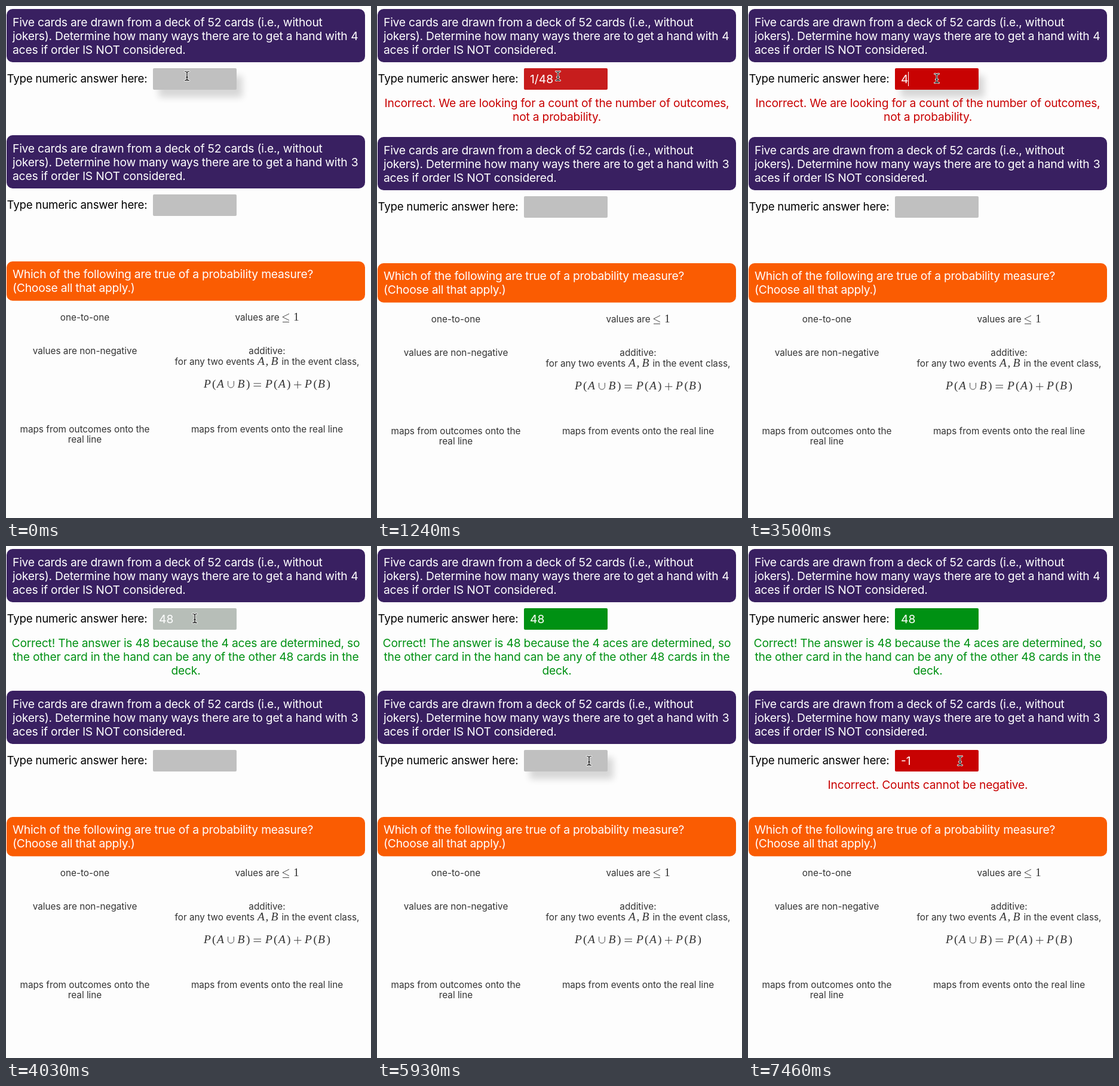
Animation of 611x856 px, one loop 8 s. Source, as an HTML page:

```html
<!DOCTYPE html>
<html lang="en">
<head>
<meta charset="utf-8">
<title>Probability quiz</title>
<style>
  html, body { margin: 0; width: 100%; height: 100%; overflow: hidden; background: #fdfdfd; }
  svg { display: block; }
  text { font-family: Inter, "Open Sans", sans-serif; font-optical-sizing: none; }
  .question, .feedback { font-size: 19.3px; letter-spacing: -.012em; }
  .question { fill: #fff; }
  .feedback, .mid { text-anchor: middle; }
  .label { font-size: 18.7px; letter-spacing: -.012em; fill: #000; }
  .typed { font-size: 19.3px; fill: #fff; }
  .answer { font-size: 15.3px; fill: #333; }
  .math { font-family: "Liberation Serif", serif; font-size: 19.5px; fill: #333; }
  .italic { font-style: italic; }
  .sign { fill: none; stroke: #333; stroke-width: .9; }
  .wrong { fill: #c80202; }
  .right { fill: #009113; }
  .shadow { fill: #000; opacity: .15; filter: blur(6px); }
  .caret { fill: #fff; }
</style>
</head>
<body>
<svg width="611" height="856" viewBox="0 0 611 856">
  <defs>
    <g id="card">
      <rect x="1" width="600" height="89" rx="10" fill="#392061"/>
      <text class="question" x="11" y="29">Five cards are drawn from a deck of 52 cards (i.e., without</text>
      <text class="question" x="11" y="52">jokers). Determine how many ways there are to get a hand with </text>
      <text class="label" x="1.5" y="123">Type numeric answer here:</text>
    </g>
    <path id="beam" fill="none" stroke-linecap="round"
      d="M-3.5-7.5Q-.5-7.5 0-6Q.5-7.5 3.5-7.5M0-6V6M-3.5 7.5Q-.5 7.5 0 6Q.5 7.5 3.5 7.5M-1.7 2H1.7"/>
  </defs>

  <g transform="translate(0 5)">
    <use href="#card"/>
    <text class="question" x="589.5" y="52" text-anchor="end">4</text>
    <text class="question" x="11" y="75">aces if order IS NOT considered.</text>
    <g class="field"></g>
    <g class="feedback wrong" data-on="950 4030">
      <text x="301" y="164">Incorrect. We are looking for a count of the number of outcomes,</text>
      <text x="301" y="187">not a probability.</text>
    </g>
    <g class="feedback right" data-on="4030 8000">
      <text x="301" y="164">Correct! The answer is 48 because the 4 aces are determined, so</text>
      <text x="301" y="187">the other card in the hand can be any of the other 48 cards in the</text>
      <text x="301" y="210">deck.</text>
    </g>
  </g>

  <g id="lower">
    <g transform="translate(0 216)">
      <use href="#card"/>
      <text class="question" x="589.5" y="52" text-anchor="end">3</text>
      <text class="question" x="11" y="75">aces if order IS NOT considered.</text>
      <g class="field"></g>
      <text class="feedback wrong" data-on="6940 8000" x="301" y="164">Incorrect. Counts cannot be negative.</text>
    </g>

    <g transform="translate(0 427)">
      <rect x="1" width="600" height="65.7" rx="10" fill="#fa5c02"/>
      <text class="question" x="11" y="28">Which of the following are true of a probability measure?</text>
      <text class="question" x="11" y="51">(Choose all that apply.)</text>

      <text class="answer mid" x="132" y="99">one-to-one</text>
      <text class="answer mid" x="132" y="155">values are non-negative</text>
      <text class="answer mid" x="132" y="286">maps from outcomes onto the</text>
      <text class="answer mid" x="132" y="303">real line</text>
      <text class="answer" x="383.5" y="99">values are</text>
      <path class="sign" d="M474 87.5L463 93L474 98.5M463 101.4H474"/>
      <text class="math" x="481" y="99">1</text>
      <text class="answer mid" x="437" y="155">additive:</text>
      <text class="answer" x="282.5" y="173">for any two events</text>
      <text class="math italic" x="421 434.5 443.5" y="173">A,B</text>
      <text class="answer" x="591.5" y="173" text-anchor="end">in the event class,</text>
      <text class="math italic" x="331 353 387.5 434 456 500 522" y="211">PABPAPB</text>
      <text class="math" x="345 402 448 470 514.5 536.5" y="211">()()()</text>
      <path class="sign" d="M371.6 200V206.5a4.9 4.6 0 0 0 9.8 0V200M414.5 204.1H427M414.5 208.5H427M482 206.3H494.4M488.2 200.1V212.5"/>
      <text class="answer mid" x="437" y="286">maps from events onto the real line</text>
    </g>
  </g>

  <g id="cursor">
    <use href="#beam" stroke="#fff" stroke-width="2.8"/>
    <use href="#beam" stroke="#000" stroke-width="1.2"/>
  </g>
</svg>
<script>
const LOOP = 8000, FADE = 580, LEAD = 35;
const GREY = [192, 192, 192], RED = [200, 2, 2], GREEN = [0, 145, 19];

const fields = [
  {
    text: [[0, ''], [170, '1'], [290, '1/'], [470, '1/4'], [590, '1/48'], [2600, ''], [3500, '4'], [3730, '48']],
    focus: [[0, 950], [2600, 4030]],
    caret: [[170, 950], [2600, 3080], [3500, 4030]],
    fades: [[950, RED], [4030, GREEN]]
  },
  {
    text: [[0, ''], [6530, '-'], [6700, '-1']],
    focus: [[5390, 6940]],
    caret: [[5390, 5930], [6410, 6940]],
    fades: [[6940, RED]]
  }
];
const shifts = [[0, 0], [950, 3], [4030, 26]];
const cursorPath = [
  [0, 303, 117], [2000, 303, 117], [2180, 316, 121], [4690, 316, 121], [4740, 333, 143],
  [4860, 359, 202], [4920, 397, 232], [5000, 413, 280], [5060, 410, 306],
  [5160, 390, 332], [5280, 360, 356], [5390, 355, 359], [LOOP, 355, 359]
];

const latest = (steps, t) => steps.findLast(step => step[0] <= t);
const within = (spans, t) => spans.some(([from, to]) => t >= from && t < to);
const show = (el, on) => el.setAttribute('visibility', on ? 'visible' : 'hidden');

// CSS "ease": cubic-bezier(.25, .1, .25, 1)
function ease(u) {
  if (u >= 1) return 1;
  let low = 0, high = 1, s;
  for (let i = 0; i < 14; i++) {
    s = (low + high) / 2;
    if (.75 * s * (1 - s) + s ** 3 < u) low = s; else high = s;
  }
  return .3 * s * (1 - s) ** 2 + 3 * s * s * (1 - s) + s ** 3;
}

function fillAt(fades, t) {
  const fade = latest(fades, t);
  if (!fade) return GREY;
  const k = ease((t - fade[0] + LEAD) / FADE);
  return GREY.map((c, i) => Math.round(c + (fade[1][i] - c) * k));
}

function cursorAt(t) {
  const i = cursorPath.findIndex(point => point[0] > t);
  const [t0, x0, y0] = cursorPath[i - 1], [t1, x1, y1] = cursorPath[i];
  const k = (t - t0) / (t1 - t0);
  return [x0 + (x1 - x0) * k, y0 + (y1 - y0) * k];
}

document.querySelectorAll('.field').forEach((group, i) => {
  group.innerHTML = `
    <rect class="shadow" x="255.6" y="111.8" width="140" height="36" rx="2"/>
    <rect x="246" y="99" width="140" height="36" rx="2"/>
    <text class="typed" x="256" y="124"></text>
    <rect class="caret" y="105" width="1" height="24"/>`;
  [fields[i].shadowEl, fields[i].boxEl, fields[i].textEl, fields[i].caretEl] = group.children;
});
const timed = [...document.querySelectorAll('[data-on]')]
  .map(el => [el, [el.dataset.on.split(' ').map(Number)]]);
const lower = document.getElementById('lower');
const cursor = document.getElementById('cursor');

function draw(t) {
  for (const f of fields) {
    f.textEl.textContent = latest(f.text, t)[1];
    f.boxEl.setAttribute('fill', `rgb(${fillAt(f.fades, t)})`);
    f.caretEl.setAttribute('x', 256 + Math.round(f.textEl.getComputedTextLength()));
    show(f.caretEl, within(f.caret, t));
    show(f.shadowEl, within(f.focus, t));
  }
  for (const [el, spans] of timed) show(el, within(spans, t));
  lower.setAttribute('transform', `translate(0 ${latest(shifts, t)[1]})`);
  cursor.setAttribute('transform', `translate(${cursorAt(t)})`);
}

const start = performance.now();
function tick() {
  draw((performance.now() - start) % LOOP);
  requestAnimationFrame(tick);
}
tick();
</script>
</body>
</html>
```
